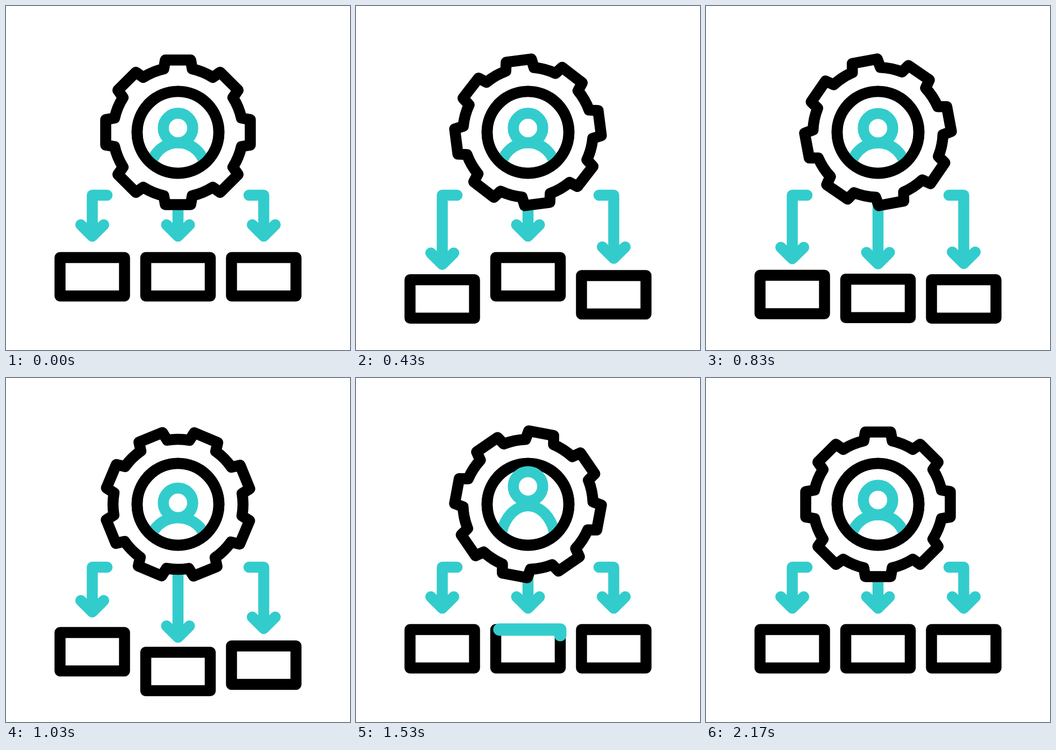
An HTML page that plays this animation: 640 by 640 pixels, repeating every 2600 ms.

```html
<!DOCTYPE html>
<html lang="en">
<head>
<meta charset="utf-8">
<title>Delegation</title>
<style>
  html, body { margin: 0; width: 100%; height: 100%; overflow: hidden; background: #fff; }
  svg { display: block; width: 100%; height: 100%; }
  svg * { stroke-width: 20.5; stroke-linecap: round; stroke-linejoin: round; }
  .ink { fill: #fff; stroke: #000; }
  .line { fill: none; stroke: #3cc; }
  .solid { fill: #fff; stroke: #3cc; }
  #trace { stroke-width: 23; }
</style>
</head>
<body>
<svg viewBox="0 0 640 640">
  <defs><clipPath id="hole"><circle cx="320" cy="235" r="72"/></clipPath></defs>
  <g id="columns"></g>
  <path id="gear" class="ink"/>
  <circle class="ink" cx="320" cy="235" r="76"/>
  <g clip-path="url(#hole)"><path id="body" class="line"/></g>
  <circle class="ink" cx="320" cy="235" r="76.2" style="fill:none"/>
  <circle id="head" class="solid" cx="320" cy="227" r="27.4"/>
</svg>
<script>
const LOOP = 2600, FRAME = 100 / 3, LAST = 65;
const $ = id => document.getElementById(id);

function add(tag, attrs, parent) {
  const el = document.createElementNS('http://www.w3.org/2000/svg', tag);
  for (const k in attrs) el.setAttribute(k, attrs[k]);
  return parent.appendChild(el);
}

const clamp = x => Math.min(1, Math.max(0, x));
const smooth = x => { x = clamp(x); return x * x * (3 - 2 * x); };

// Cubic ease with flat ends and handles at x1 and x2
function ease(x1, x2) {
  return x => {
    x = clamp(x);
    let lo = 0, hi = 1;
    for (let i = 0; i < 30; i++) {
      const t = (lo + hi) / 2, s = 1 - t;
      if (3 * s * s * t * x1 + 3 * s * t * t * x2 + t * t * t < x) lo = t; else hi = t;
    }
    return smooth(lo);
  };
}

// Eased value between [frame, value] steps
function track(steps, n) {
  if (n <= steps[0][0]) return steps[0][1];
  for (let i = 1; i < steps.length; i++) {
    const [a, from] = steps[i - 1], [b, to] = steps[i];
    if (n <= b) return from + (to - from) * smooth((n - a) / (b - a));
  }
  return steps[steps.length - 1][1];
}

const TEETH = 8, ROOT = 121;
function gearPath() {
  const tooth = [[-26.5, -118], [-23.6, -134.5], [23.6, -134.5], [26.5, -118]];
  let d = '';
  for (let i = 0; i < TEETH; i++) {
    const a = i * 2 * Math.PI / TEETH, c = Math.cos(a), s = Math.sin(a);
    tooth.forEach(([x, y], j) => {
      const p = (x * c - y * s).toFixed(2) + ' ' + (x * s + y * c).toFixed(2);
      d += j ? 'L' + p : i ? `A${ROOT} ${ROOT} 0 0 1 ${p}` : 'M' + p;
    });
  }
  const [x, y] = tooth[0];
  return `${d}A${ROOT} ${ROOT} 0 0 1 ${x} ${y}Z`;
}
$('gear').setAttribute('d', gearPath());

// x: centre line, side: start of the arm, delay in frames, reach: arrow travel per box travel
const columns = [
  { x: 160.5, side: 27.5, delay: 0, reach: 1.27 },
  { x: 320, side: 0, delay: 13.3, reach: 1.28 },
  { x: 479.5, side: -27.5, delay: 5.2, reach: 1.23 }
];
for (const col of columns) {
  col.arrow = add('path', { class: 'line' }, $('columns'));
  col.group = add('g', {}, $('columns'));
  add('rect', { class: 'ink', x: col.x - 60, y: 467.9, width: 120, height: 71.5 }, col.group);
}
const trace = add('path', {
  id: 'trace', class: 'line', d: 'M264 467.9H380V539.4H260V467.9H264'
}, columns[1].group);
const traceLen = 383;

const dipEase = ease(.765, .8545), turnEase = ease(.15, .67);
const DIP = 42.5, HALF = 16.3, TURN = 112.5;
const dip = u => DIP * (1 - dipEase(Math.abs(u - HALF) / HALF));
const headSteps = [[24, 0], [30.5, 5.7], [40.5, -54.7], [51, 0]];
const bodySteps = [[24, 0], [30.5, 6], [40.5, -35.3], [51, 0]];

function draw(n) {
  const turn = -TURN * (turnEase(n / 32) + turnEase((n - 32) / 32));
  $('gear').setAttribute('transform', `translate(320 235) rotate(${turn})`);

  for (const { x, side, delay, reach, arrow, group } of columns) {
    const dy = dip(n - delay), y = 407 + dy * reach;
    arrow.setAttribute('d',
      `M${x + side} 352H${x}V${y + 21.2}M${x - 21.3} ${y}l21.3 21.2l21.3 -21.2`);
    group.setAttribute('transform', `translate(0 ${dy})`);
  }

  $('head').setAttribute('cy', 227 + track(headSteps, n));
  const ry = 50.8 - track(bodySteps, n);
  $('body').setAttribute('d', `M269.4 320V305A50.6 ${ry} 0 0 1 370.6 305V320`);

  const from = traceLen * smooth((n - 45) / 20), to = traceLen * smooth((n - 41) / 13);
  const on = to > from;
  trace.style.display = on ? '' : 'none';
  if (on) trace.setAttribute('stroke-dasharray', `0 ${from} ${to - from} 900`);
  // the leading zero dash would leave a round dot, so shift it away
  if (on) {
    trace.setAttribute('stroke-dasharray', `${to - from} 900`);
    trace.setAttribute('stroke-dashoffset', -from);
  }
}

const start = performance.now();
function tick(now) {
  const t = Math.max(0, now - start) % LOOP;
  draw(Math.min(LAST, Math.floor((Math.floor(t / 10) * 10 + 4) / FRAME)));
  requestAnimationFrame(tick);
}
draw(0);
requestAnimationFrame(tick);
</script>
</body>
</html>
```
